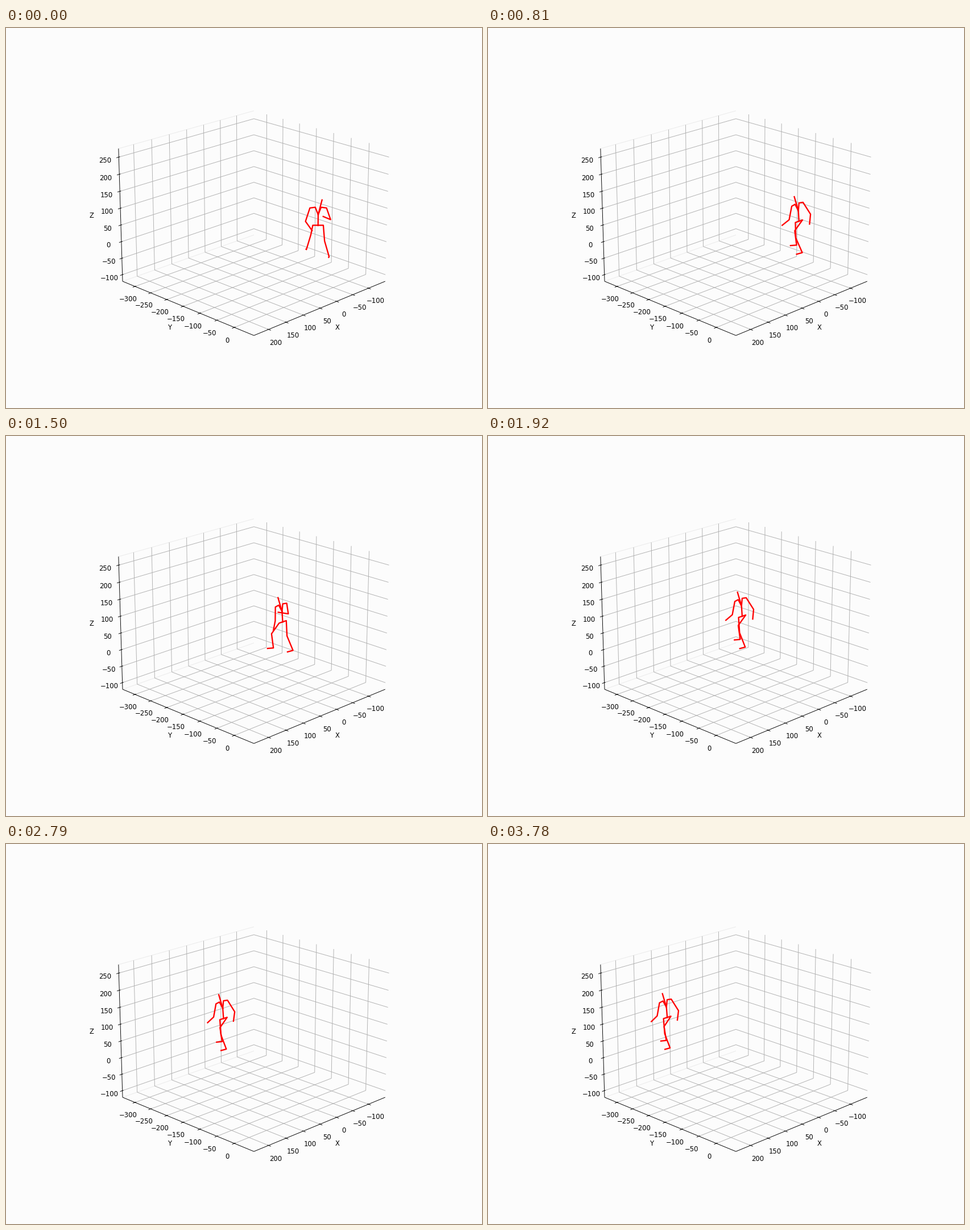
Animation, 837 px wide and 669 px high, one loop 3.81 s. Source, as a matplotlib script:

```python
import math

import matplotlib.pyplot as plt
import numpy as np
from matplotlib.animation import FuncAnimation

W, H, DPI = 837, 669, 96
FRAMES, STEP = 127, 30
PX = 72 / DPI            # points per pixel
FONT = 11.62 * PX
THIN = 0.93 * PX

plt.rcParams["font.family"] = "DejaVu Sans"
fig = plt.figure(figsize=(W / DPI, H / DPI), dpi=DPI, facecolor="#fcfcfc")
ax = fig.add_axes([0, 0, 1, 1])
ax.set_xlim(0, W)
ax.set_ylim(H, 0)
ax.axis("off")

# --- perspective box seen from azimuth 45, elevation 20 ---
SIN, COS = math.sin(math.radians(20)), math.cos(math.radians(20))
SIDE, HALF_H = 0.8418, 0.4464
FOCAL, DIST = 2784.5, 10
CX, CY = 435.9, 330.9
UNIT = 0.1266 / 50       # box length of one data unit


def project(u, v, w):
    """Pixel of a box point: u and v run from the front corner, w runs up."""
    lateral = SIDE * (u - v)
    depth = SIDE * (u + v - 1)
    height = HALF_H * (2 * w - 1)
    scale = FOCAL / (DIST + depth * COS - height * SIN)
    return CX + scale * lateral, CY - scale * (height * COS + depth * SIN)


def box_u(x):
    return 0.1039 + (200 - x) * UNIT


def box_v(y):
    return 0.8984 - (y + 300) * UNIT


def box_w(z):
    return 0.0515 + (z + 100) * UNIT


# --- axes, grid and labels ---
CELL = 0.08
OUT, IN = 0.2 * CELL, 0.1 * CELL
TICK_PAD, LABEL_PAD = 0.623 * CELL, 1.354 * CELL


def line(*points, color="black"):
    xs, ys = zip(*(project(*p) for p in points))
    ax.plot(xs, ys, color=color, lw=THIN, solid_capstyle="butt")


def text(point, label, va):
    x, y = project(*point)
    ax.text(x, y, str(label).replace("-", "\u2212"), fontsize=FONT,
            ha="center", va=va)


x_ticks = [(v, box_u(v)) for v in range(-100, 201, 50)]
y_ticks = [(v, box_v(v)) for v in range(-300, 1, 50)]
z_ticks = [(v, box_w(v)) for v in range(-100, 251, 50)]

for w in (0, 1):
    line((0, 1, w), (1, 1, w), color="#eaeaea")

GRID = "#b0b0b0"
for _, t in x_ticks:
    line((t, 0, 0), (t, 1, 0), (t, 1, 1), color=GRID)
for _, t in y_ticks:
    line((0, t, 0), (1, t, 0), (1, t, 1), color=GRID)
for _, t in z_ticks:
    line((0, 1, t), (1, 1, t), (1, 0, t), color=GRID)

line((1, 0, 0), (0, 0, 0), (0, 1, 0))
line((0, 1, 0), (0, 1, 1))

for value, t in x_ticks:
    line((t, -OUT, 0), (t, IN, 0))
    text((t, -TICK_PAD, -TICK_PAD), value, "top")
for value, t in y_ticks:
    line((-OUT, t, 0), (IN, t, 0))
    text((-TICK_PAD, t, -TICK_PAD), value, "top")
for value, t in z_ticks:
    line((-OUT, 1, t), (IN, 1, t))
    text((-TICK_PAD, 1 + TICK_PAD, t), value, "top")

text((0.5, -LABEL_PAD, -LABEL_PAD), "X", "center")
text((-LABEL_PAD, 0.5, -LABEL_PAD), "Y", "center")
text((-LABEL_PAD, 1 + LABEL_PAD, 0.5), "Z", "center")

# --- walking figure, in data units ---
HIP_Z = 84
THIGH, SHIN, FOOT = 45, 41, 19
UPPER_ARM, FOREARM = 36, 30
TURN_FRAMES = 24

# ground path of the pelvis and gait cycles walked so far
KEYS = np.array([0, 12, 27, 50, 78, 93, 111, 126])
PATH_X = np.array([0, -17, -16, 2, 21, 40, 73, 93])
PATH_Y = np.array([0, 2, -18, -99, -208, -238, -267, -301])
CYCLES = np.array([0, 0.23, 0.52, 1.0, 1.97, 2.43, 2.97, 3.43])


def glide(f, values):
    """Cubic Hermite curve through the key values."""
    slopes = np.gradient(values, KEYS)
    k = min(np.searchsorted(KEYS, f, side="right"), len(KEYS) - 1) - 1
    h = KEYS[k + 1] - KEYS[k]
    s = (f - KEYS[k]) / h
    ease = s * s * (3 - 2 * s)
    return (values[k] * (1 - ease) + values[k + 1] * ease
            + h * s * (1 - s) * (slopes[k] * (1 - s) - slopes[k + 1] * s))


def swing(length, degrees, outward=0):
    """Hanging limb tilted forward: (forward, left, up)."""
    a = math.radians(degrees)
    return np.array([length * math.sin(a), outward, -length * math.cos(a)])


def leg(pelvis, phase, side, spread):
    p = phase % 1
    thigh = 13 + 17 * math.cos(math.tau * (p + 0.05))
    lift = math.exp(-((p - 0.68) / 0.1) ** 2)
    shin = -8 - 16 * math.sin(math.pi * p) ** 2 - 42 * lift
    hip = pelvis + (0, 10.8 * side, 0)
    knee = hip + swing(THIGH, thigh, 3 * side * spread)
    ankle = knee + swing(SHIN, shin, 9 * side * spread)
    toe = ankle + swing(FOOT, 70 + shin / 2)
    return [pelvis, hip, knee, ankle, toe]


def arm(pelvis, chest, phase, side, spread, vigour):
    beat = vigour * math.cos(math.tau * phase)
    collar = pelvis + (6, 6 * side, 49.5)
    shoulder = pelvis + (5, 17 * side, 48)
    elbow = shoulder + swing(UPPER_ARM, -8 - 14 * beat, 9 * side)
    hand = elbow + swing(FOREARM, 14 + 28 * vigour - 38 * beat,
                         -14 * side * spread)
    return [chest, collar, shoulder, elbow, hand]


def pose(f):
    """Limbs as joint lists in body axes, plus the heading in radians."""
    s = min(f / TURN_FRAMES, 1)
    turn = s * s * (3 - 2 * s)
    spread = 1 - turn
    phase = glide(f, CYCLES)
    pelvis = np.array([0, 0, HIP_Z])
    chest = pelvis + (2, 0, 30)
    head = pelvis + (14, -8 * spread, 67)
    neck = chest + 0.58 * (head - chest)
    limbs = [[pelvis, chest, neck, head]]
    for side, p, vigour in ((1, phase, 0.4), (-1, phase + 0.5, 1)):
        limbs.append(arm(pelvis, chest, p, side, spread, vigour))
        limbs.append(leg(pelvis, p, side, spread))
    return limbs, math.radians(225 + 45 * turn)


strokes = [ax.plot([], [], color="red", lw=2.32 * PX,
                   solid_capstyle="projecting", solid_joinstyle="round")[0]
           for _ in range(5)]


def update(f):
    limbs, heading = pose(f)
    c, s = math.cos(heading), math.sin(heading)
    x0, y0 = glide(f, PATH_X), glide(f, PATH_Y)
    for stroke, joints in zip(strokes, limbs):
        ahead, left, up = np.array(joints).T
        x = x0 + ahead * c - left * s
        y = y0 + ahead * s + left * c
        stroke.set_data(*project(box_u(x), box_v(y), box_w(up)))
    return strokes


anim = FuncAnimation(fig, update, frames=FRAMES, interval=STEP, repeat=True,
                     repeat_delay=0, blit=False)
plt.show()
```
